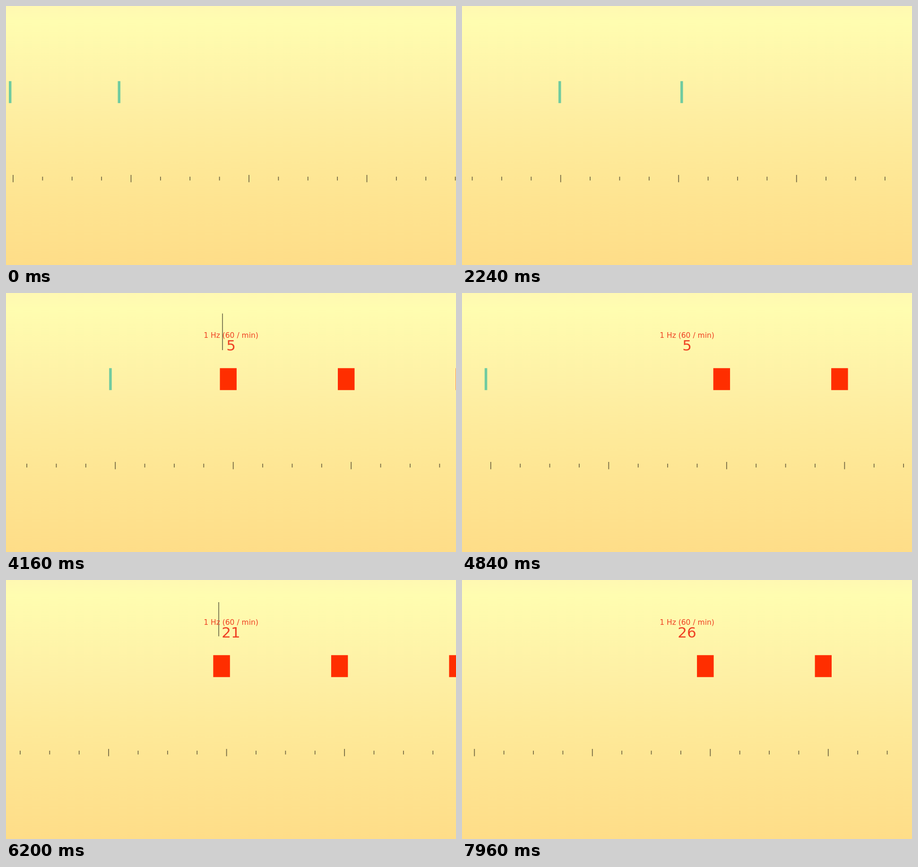
An HTML page with a canvas for the animation above (8000 ms loop, 952 by 549 pixels).

```html
<!DOCTYPE html>
<html lang="en">
<head>
<meta charset="utf-8">
<title>Rhythm taps</title>
<style>
  html, body { margin: 0; width: 100%; height: 100%; overflow: hidden; }
  canvas { display: block; width: 952px; height: 549px; }
</style>
</head>
<body>
<canvas id="stage" width="952" height="549"></canvas>
<script>
const ctx = document.getElementById('stage').getContext('2d');
const W = 952, H = 549, NOW_X = W / 2;
const LOOP = 8000, STEP = 40;
const BEAT = 249.5;              // pixels per beat and per second
const FIRST_TICK = 15;

// Scroll distance at given times; the pace wavers a little.
const SCROLL = [[0, 0], [1320, 324.5], [3120, 775], [4160, 1031.3],
                [5520, 1372], [6800, 1696.5], [7960, 1984.7], [8000, 1994.7]];

// Positions along the ruler
const TAPS = [11.5, 242, 516.5, 764.3, 1022.3, 1255];
const GAME_START = TAPS[5] - NOW_X;
const FIRST_TARGET = 1501.5;
const HITS = [
  { at: 1489.3, points: 5 },
  { at: 1751, points: 9 },
  { at: 1994.5, points: 7 },
  { at: 2262, points: 5 }
];
const FALL = 0.463, TARGET_LINGER = 0.15;   // seconds

const GREEN = '#70cba0', RED = '#ff2e00', TEXT = '#ef4123', INK = 'rgba(0,0,0,.53)';

const sky = ctx.createLinearGradient(0, 0, 0, H);
[[0, '#fff8b2'], [0.06, '#fffdb0'], [0.36, '#fef0a5'],
 [0.55, '#feea9a'], [0.75, '#fee491'], [1, '#fedd88']]
  .forEach(([stop, color]) => sky.addColorStop(stop, color));

function scrollAt(t) {
  const i = Math.max(1, SCROLL.findIndex(([time]) => time >= t));
  const [t0, s0] = SCROLL[i - 1], [t1, s1] = SCROLL[i];
  return s0 + (s1 - s0) * (t - t0) / (t1 - t0);
}

function rect(x, y, w, h, color) {
  ctx.fillStyle = color;
  ctx.fillRect(x, y, w, h);
}

function label(text, y, size) {
  ctx.font = `${size}px "DejaVu Sans", sans-serif`;
  ctx.textAlign = 'center';
  ctx.fillStyle = TEXT;
  ctx.fillText(text, NOW_X, y);
}

function drawRuler(scroll) {
  const gap = BEAT / 4;
  const first = Math.floor((scroll - FIRST_TICK) / gap);
  for (let i = first; i < first + 18; i++) {
    const x = FIRST_TICK + i * gap - scroll;
    const h = i % 4 === 0 ? 15.5 : 8;
    rect(x - 0.9, 365.8 - h / 2, 1.8, h, INK);
  }
}

function drawTap(x) {
  rect(x - 5.5, 159.3, 5.5, 46.5, GREEN);
}

function drawTargets(scroll, ages) {
  for (let i = 0; i < 8; i++) {
    if (ages[i] > TARGET_LINGER) continue;
    const x = FIRST_TARGET + i * BEAT - scroll;
    rect(x - 17.7, 159.3, 35.4, 46.5, RED);
  }
}

// The hit line drops and shrinks while it travels with the ruler.
function drawHit(x, age) {
  const p = age / FALL;
  if (p < 0 || p >= 1) return;
  const h = 83 * (1 - p * p * (3 - 2 * p));
  const y = 82 + 467 * p ** 4;
  rect(x - 0.9, y - h / 2, 1.8, h, INK);
}

function draw(t) {
  const scroll = scrollAt(t);
  const head = scroll + NOW_X;
  rect(0, 0, W, H, sky);
  drawRuler(scroll);
  TAPS.filter(at => at <= head).forEach(at => drawTap(at - scroll));
  if (scroll < GAME_START) return;

  const ages = HITS.map(hit => (head - hit.at) / BEAT);
  drawTargets(scroll, ages);
  HITS.forEach((hit, i) => drawHit(hit.at - scroll, ages[i]));
  const score = HITS.reduce((sum, hit, i) => sum + (ages[i] >= 0 ? hit.points : 0), 0);
  label('1 Hz (60 / min)', 95.2, 15.5);
  label(score, 122, 31);
}

const start = performance.now();
function frame() {
  const t = (performance.now() - start) % LOOP;
  draw(Math.floor(t / STEP) * STEP);
  requestAnimationFrame(frame);
}
frame();
</script>
</body>
</html>
```
